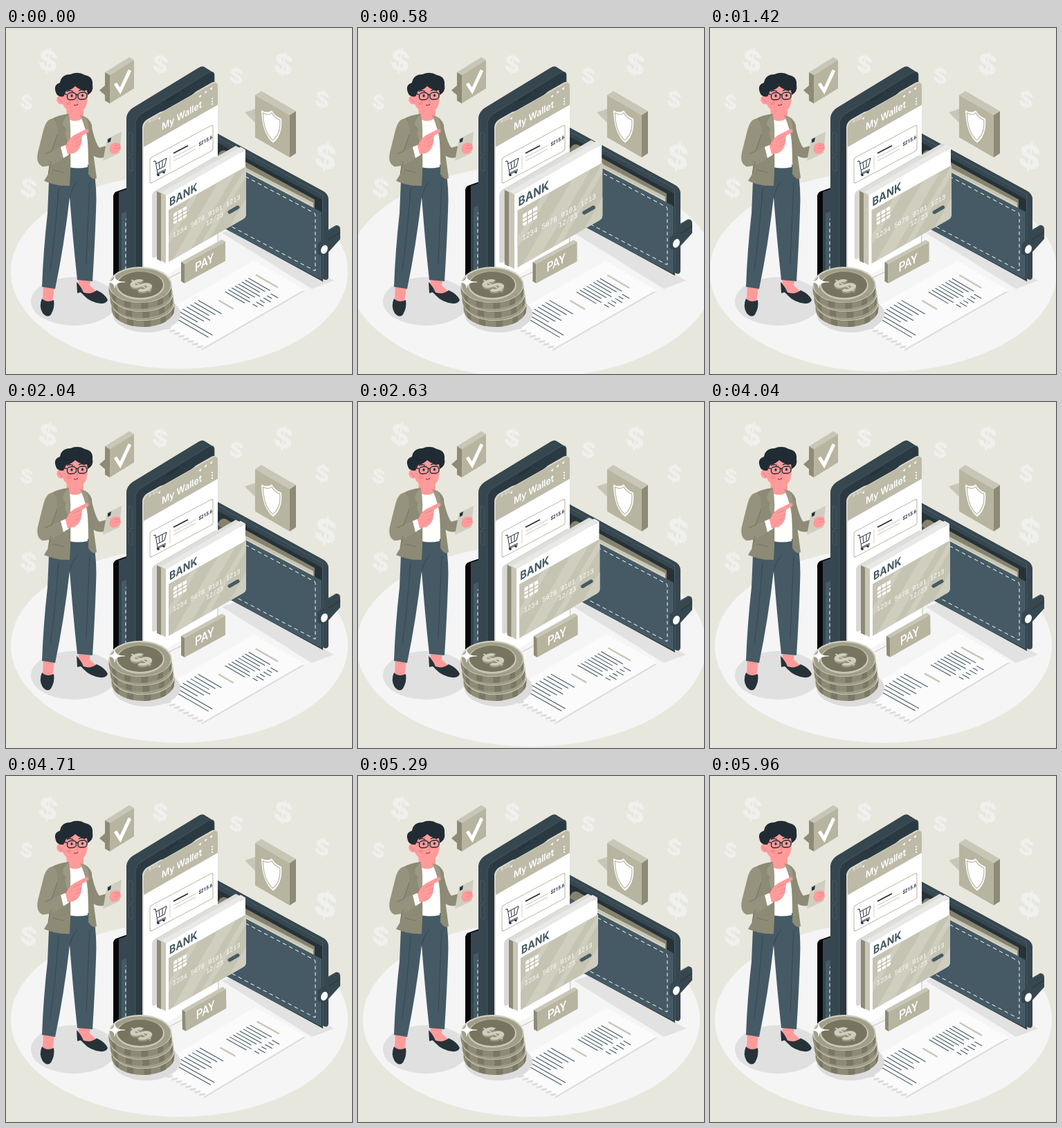
Recreate the animation shown at these times as an HTML page with a canvas. Size 500 by 500 pixels, loop 6 s.

```html
<!DOCTYPE html>
<html lang="en">
<head>
<meta charset="utf-8">
<title>My Wallet</title>
<style>
html, body { margin: 0; width: 100%; height: 100%; overflow: hidden; background: #e8e7dd; }
canvas { display: block; width: 100vw; height: 100vh; }
</style>
</head>
<body>
<canvas id="stage" width="500" height="500"></canvas>
<script>
const g = document.getElementById('stage').getContext('2d');
const LOOP = 6000, TAU = Math.PI * 2;
const INK = '#263238', NAVY = '#37474f', BLUE = '#455a64', SKIN = '#ff9b9b', WHITE = '#fff';
const SAND = '#b7b49f', DARK = '#8d8a75', PALE = '#c8c6b6';
const SANS = 'Inter, "Open Sans", sans-serif';
const MONO = '"Liberation Mono", monospace';

function within(m, draw) {
  g.save();
  g.transform(...m);
  draw();
  g.restore();
}
function poly(color, ...p) {
  g.beginPath();
  for (let i = 0; i < p.length; i += 2) g.lineTo(p[i], p[i + 1]);
  g.closePath();
  g.fillStyle = color;
  g.fill();
}
function line(color, width, ...p) {
  g.beginPath();
  for (let i = 0; i < p.length; i += 2) g.lineTo(p[i], p[i + 1]);
  g.strokeStyle = color;
  g.lineWidth = width;
  g.stroke();
}
function shape(color, d) {
  g.fillStyle = color;
  g.fill(new Path2D(d));
}
function curve(color, width, d) {
  g.strokeStyle = color;
  g.lineWidth = width;
  g.stroke(new Path2D(d));
}
function oval(color, x, y, rx, ry, turn = 0) {
  g.beginPath();
  g.ellipse(x, y, rx, ry, turn, 0, TAU);
  g.fillStyle = color;
  g.fill();
}
// upright wall: a rounded rectangle sheared by slope k
function panel(color, x, y, w, h, r = 0, k = -.57, stroke = 0) {
  within([1, k, 0, 1, x, y], () => {
    g.beginPath();
    g.roundRect(0, 0, w, h, r);
    g.fillStyle = g.strokeStyle = color;
    g.lineWidth = stroke;
    stroke ? g.stroke() : g.fill();
  });
}
function stitch(x, y, w, h, k) {
  g.setLineDash([5, 4]);
  panel(WHITE, x, y, w, h, 2, k, 1);
  g.setLineDash([]);
}
// wall with thickness reaching back by (dx, dy)
function slab(x, y, w, h, k, dx, dy, front, side, top) {
  const ex = dx < 0 ? x : x + w, ey = dx < 0 ? y : y + k * w;
  poly(top, x, y, x + dx, y + dy, x + w + dx, y + k * w + dy, x + w, y + k * w);
  poly(side, ex, ey, ex + dx, ey + dy, ex + dx, ey + dy + h, ex, ey + h);
  panel(front, x, y, w, h, 0, k);
}
function label(s, x, y, font, color) {
  within([.866, -.5, 0, 1, x, y], () => {
    g.font = font;
    g.fillStyle = color;
    g.fillText(s, 0, 0);
  });
}
function dollar(x, y, size, color, m) {
  within([...m, x, y], () => {
    g.font = `800 ${size}px ${SANS}`;
    g.fillStyle = color;
    g.textAlign = 'center';
    g.fillText('$', 0, size * .365);
  });
}

function backdrop(beat) {
  g.fillStyle = '#e8e7dd';
  g.fillRect(0, 0, 500, 500);
  oval('#f5f5f5', 250.5, 352, 243.5 * beat, 140.5 * beat);
  const lean = [1, .27, -.14, .95];
  [[61, 47, 42], [30, 107, 28], [33, 231, 36], [223, 52, 34], [333, 69, 30],
   [401, 52, 41], [457, 103, 32], [462, 186, 48]]
    .forEach(([x, y, s]) => dollar(x, y, s, '#f0f0ee', lean));
  oval('#e0e0e0', 98, 395, 62, 35);
  poly('#e2e2e2', 312, 296, 442, 377, 474, 365, 340, 286);
}

function wallet(lift) {
  within([1, 0, 0, 1, 0, lift], () => {
    panel('#05080a', 155, 238, 35, 150, 5, -.35);
    panel(NAVY, 163, 237, 30, 150, 0, -.35);
    panel(BLUE, 167, 268, 30, 130, 0, -.4);
    stitch(173, 276, 40, 130, -.45);

    panel(NAVY, 290, 144, 176, 127, 7, .545);
    panel(INK, 290, 157, 167, 118, 0, .545);
    panel(BLUE, 290, 149, 168, 1.2, 0, .545);
    panel(BLUE, 457, 241, 1.2, 126, 0);
    shape('#85826e', 'M306 200V184Q312 172 322 180L446 248V266Z');
    panel(PALE, 322, 189, 122, 14, 0, .52);
    panel('#e3e2d6', 322, 194, 122, 1, 0, .52);
    panel(BLUE, 290, 178, 166, 98, 0, .53);
    stitch(290, 185, 157, 83, .53);
    shape(NAVY, 'M450 312L465 300V292L477 285Q483 285 483 291V305L465 325Q455 332 450 326Z');
    line(BLUE, 1.2, 465, 293, 477, 286);
    line(INK, 1, 466, 306, 483, 295);
    oval(WHITE, 460, 320, 4.6, 6.6, .4);
  });
}

function receipt() {
  const at = (u, v) => [360 + .866 * (u - v), 335 + .5 * (u + v)];
  const bar = (color, w, u0, u1, v) => line(color, w, ...at(u0, v), ...at(u1, v));
  const wide = 84, teeth = 22, sheet = [];
  for (let i = 0; i <= teeth; i++) sheet.push(...at(i / teeth * wide, i % 2 * 4));
  for (let i = teeth; i >= 0; i--) sheet.push(...at(i / teeth * wide, 173 - i % 2 * 6));
  within([1, 0, 0, 1, -1, 3], () => poly('#dcdcdc', ...sheet));
  poly('#fbfbfb', ...sheet);
  bar(PALE, 2.4, 22, 59, 21);
  for (let i = 0; i < 8; i++) bar(BLUE, 1.1, 21, 57 - i % 3 * 3, 32 + i * 5.6);
  for (let i = 0; i < 6; i++) bar(BLUE, 1.1, 62, 74 - i % 2 * 4, 36 + i * 6);
  bar(PALE, 2.4, 28, 53, 89);
  for (let i = 0; i < 8; i++) bar(BLUE, 1.1, 11, i > 5 ? 73 : 50 - i % 3 * 4, 106 + i * 6.4);
}

function payButton() {
  line(SAND, .8, 236, 361, 254, 352);
  line(SAND, .8, 306, 290, 306, 310);
  slab(258, 341, 59, 28, -.545, -5, -3, SAND, DARK, PALE);
  label('PAY', 273, 353, '500 18px Roboto, sans-serif', WHITE);
}

function phone() {
  const depth = 13;
  for (let i = 0; i <= depth; i++) panel(NAVY, 174 + i, 121 + i * .62, 114, 237, 9, -.61);
  panel('#2b3a42', 187, 129, 114, 237, 9, -.61);
  panel(BLUE, 187, 129, 114, 237, 9, -.61, .8);
  panel(BLUE, 177, 150, 6, 32, 3, .4, 1);
  panel(BLUE, 177, 185, 6, 20, 3, .4, 1);

  // floating screen
  panel('#d9d8cf', 197, 136, 107, 238, 7);
  panel(WHITE, 199, 137, 107, 238, 7);
  panel('#bdbaa8', 199, 137, 107, 35, [7, 7, 0, 0]);
  shape('#2b3a42', 'M220 121L266 91L276 89Q273 94 268 97L231 118Q224 122 220 121Z');
  line(INK, 3, 232, 106, 250, 95);
  oval(INK, 257, 91, 1.7, 1.9);
  label('8:53', 206, 138, '500 7px ' + SANS, '#efeee8');
  [[221, 131], [280, 99], [288, 93], [296, 88]].forEach(([x, y]) =>
    poly(WHITE, x - 1.5, y, x + 2.5, y - 3, x + 1, y + 1.5));
  [102, 106, 110].forEach(y => oval(WHITE, 298, y, 1, 1.2));
  label('My Wallet', 225, 148, '600 14px ' + SANS, WHITE);

  panel(SAND, 208, 188, 91, 37, 3, -.53, 1);
  curve(INK, 1, 'M213 193L216 192L219 210L231 204M217 196L232 188L229 200L219 205M221 194L222 203M226 191V201M219 210L218 212L231 206');
  oval(INK, 220, 212.5, 1.8, 1.8);
  oval(INK, 228, 208.5, 1.8, 1.8);
  line(PALE, .8, 237, 184, 237, 204);
  line(INK, 1.9, 242, 181, 263, 170);
  line(PALE, 1, 242, 187, 274, 170);
  line(PALE, 1, 242, 192, 274, 175);
  label('$215.6', 278.5, 171, '600 7.2px Roboto, sans-serif', INK);
}

function card(beat) {
  const k = -.577;
  within([beat, 0, 0, beat, 282 - 282 * beat, 256 - 256 * beat], () => {
    panel('#d9d8d6', 211, 238, 94, 96, 5, k);
    slab(224, 239, 114, 98, k, -6, -3, PALE, DARK, '#dededa');
    slab(231, 242, 115, 98, k, -7, -4, WHITE, PALE, '#e9e9e7');
    g.save();
    g.clip(new Path2D('M235 263L347 200V269Q347 273 343 276L235 338Z'));
    g.fillStyle = '#c5c3b2';
    g.fillRect(230, 190, 120, 150);
    for (let i = 0; i < 5; i++) {
      const x = 205 + i * 27, w = 8 + i % 2 * 9;
      poly('#cfcebf', x, 350, x + w, 350, x + 88 + w, 200, x + 88, 200);
    }
    g.restore();
    label('BANK', 236, 258, '700 16.2px ' + SANS, BLUE);
    panel(WHITE, 242, 268, 19, 16, 2, k);
    curve(SAND, 1.2, 'M242 274L261 263M242 279L261 268M248 265V281M255 261V277');
    label('1234 5678 9101 1213', 241, 303, '9.9px ' + MONO, WHITE);
    label('12/23', 289, 286, '9.6px ' + MONO, WHITE);
    g.lineCap = 'round';
    line(BLUE, 5, 323, 266, 335, 259);
    g.lineCap = 'butt';
  });
}

function coin(x, y) {
  const h = 9, rx = 45.5, ry = 26;
  const rim = (color, a, b) => {
    g.beginPath();
    g.ellipse(x, y, rx, ry, 0, a, b);
    g.ellipse(x, y + h, rx, ry, 0, b, a, true);
    g.fillStyle = color;
    g.fill();
  };
  rim(DARK, 0, Math.PI);
  for (let a = .2; a < 3; a += .56) rim('#7a7763', a, a + .22);
  oval('#d2d0c1', x, y, rx, ry);
  oval('#a19e89', x, y + .8, rx - 1.5, ry - 1.4);
}
function coins() {
  oval('#dcdcdc', 203, 413, 49, 27);
  for (let i = 2; i >= 0; i--) coin(194 + i * 2, 371 + i * 13);
  oval('#c9c7b7', 194, 372, 35, 20.5);
  oval('#77745f', 194, 371, 33, 19);
  const floor = [.866, -.5, .866, .5];
  dollar(195, 374.5, 35, '#99967f', floor);
  dollar(195, 372, 35, '#cfcdbd', floor);
  shape(WHITE, 'M145 367Q157 367 157 357Q157 367 173 367Q157 367 157 377Q157 367 145 367Z');
  line(WHITE, .9, 146, 367, 172, 367);
  line(WHITE, .9, 157, 358, 157, 376);
}

function man() {
  shape(SKIN, 'M54 370L70 374L67 397L53 394Z');
  shape(SKIN, 'M105 360L122 364L121 372L134 384L118 386L104 374Z');
  shape(INK, 'M52 391Q59 398 69 393Q71 404 65 414Q60 420 53 412Q47 402 52 391Z');
  shape(INK, 'M102 367Q108 373 112 382Q122 386 131 379Q143 384 147 393Q145 399 136 398Q121 396 112 386L108 382L103 383Z');
  shape(BLUE, 'M63 198H126Q132 232 130 265Q128 320 125 366L103 364Q97 310 92 244Q84 315 71 377L52 374Q54 320 60 268Z');
  curve(NAVY, 1, 'M92 246Q94 232 103 222M76 232Q71 300 64 350M121 222Q118 290 116 340');

  // far arm with tablet
  shape(DARK, 'M112 128Q121 132 125 148Q130 168 135 173L149 169L150 184Q136 191 127 185Q119 171 116 160Z');
  shape(WHITE, 'M88 128L109 126Q117 135 118 158V201Q104 204 91 201Z');
  shape(SKIN, 'M87 112H112V128Q104 139 88 131Z');
  poly('#cfcec1', 146, 160, 167, 150, 164, 181, 140, 192);
  poly(INK, 147, 161, 152, 158, 151, 164, 147, 166);
  shape(SKIN, 'M151 169Q157 163 165 167L166 174L164 178Q158 183 152 181L149 176Z');
  curve('#ed7f83', .8, 'M156 170L164 169M156 174L165 173');

  // jacket
  shape(DARK, 'M91 124Q74 126 65 132Q60 150 65 171L61 211L55 221Q73 229 92 228Q95 183 91 154Z');
  shape('#9c9984', 'M91 125Q82 131 82 140L87 146L85 152L92 172Q95 146 91 125Z');
  shape(DARK, 'M110 127Q120 129 124 140L126 180L131 217Q125 221 119 211Q120 180 117 153Z');
  shape('#9c9984', 'M107 126Q113 127 118 134L121 149L118 153L119 168Q115 142 107 126Z');
  shape('#95927d', 'M67 131Q58 132 54 148L46 180Q43 195 52 200Q64 202 83 188L79 171L65 178L74 154Q76 136 67 131Z');
  curve('#747160', .9, 'M74 154L66 178L56 182M65 193L61 211M67 205L84 209');
  shape(WHITE, 'M79 172L86 169L91 183L83 188Z');
  shape(SKIN, 'M86 170Q93 156 102 153L116 146Q120 146 119 150L110 156L109 164Q109 175 98 181L89 182Z');
  curve('#ed7f83', .9, 'M98 161L108 156M101 166L109 162M100 171L108 167');

  // head
  shape(SKIN, 'M82 86Q101 76 118 88Q119 108 114 116Q108 123 97 121Q85 119 82 110Z');
  oval(SKIN, 79, 104, 5.5, 6.5, -.4);
  curve('#e77d80', 1, 'M76 103Q79 103 81 108');
  shape('#202b33', 'M83 99Q74 100 72 93Q68 82 78 79Q80 67 93 67Q104 62 114 68Q126 70 125 82Q127 92 118 97L117 90Q108 91 100 84Q94 90 87 91Z');
  curve(INK, 1.5, 'M88 92Q92 89 97 92M105 91Q109 88 114 91');
  curve(INK, 1.5, 'M101 97Q102 95 104 97M88 96L80 95');
  [[95, 99], [110.5, 98.5]].forEach(([x, y]) => {
    panel(INK, x - 6.5, y - 5, 13, 10, 4.5, -.05, 1.5);
    oval(INK, x, y - 1, 1.6, 2);
  });
  curve('#e77d80', 1, 'M102 99L104 106L101 107');
  curve('#a6363e', 1.1, 'M98 111Q101 113 104 110');
  oval('#f98a8d', 91, 109, 3.6, 2.4);
}

function bubbles() {
  poly(DARK, 143, 83, 135, 90, 143, 97);
  slab(150, 68, 35, 41, -.62, -7, -4, SAND, DARK, PALE);
  line(WHITE, 5, 158, 80, 165, 91, 179, 61);

  poly(PALE, 345, 122, 360, 117, 360, 137);
  slab(360, 97, 50, 61, .58, 9, -6, SAND, DARK, PALE);
  const shield = 'M384 119Q389 128 398 131Q400 155 386 166Q370 153 369 119Q378 124 384 119Z';
  shape(WHITE, shield);
  within([.84, 0, 0, .84, 61.4, 22.7], () => curve(SAND, 1.4, shield));
}

// rises for 600 ms, then falls for the given time
const pulse = (t, fall) => Math.max(0, Math.min(t / 600, 1 - (t - 600) / fall));
const wave = (t, period) => Math.cos(t / period * TAU);

function draw(t) {
  const beat = 1 + .1 * (pulse(t, 1200) + pulse(t - 2400, 600));
  const lift = -5 * (1 - wave(t, 1500));
  const a = (.75 * wave(t - 1000, LOOP) - .375) * Math.PI / 180;
  backdrop(beat);
  wallet(lift);
  phone();
  g.save();
  g.translate(250, 250);
  g.rotate(a);
  g.translate(-250, -250);
  receipt();
  payButton();
  g.restore();
  card(beat);
  coins();
  man();
  bubbles();
}

const start = performance.now();
function frame() {
  draw((performance.now() - start) % LOOP);
  requestAnimationFrame(frame);
}
frame();
</script>
</body>
</html>
```
